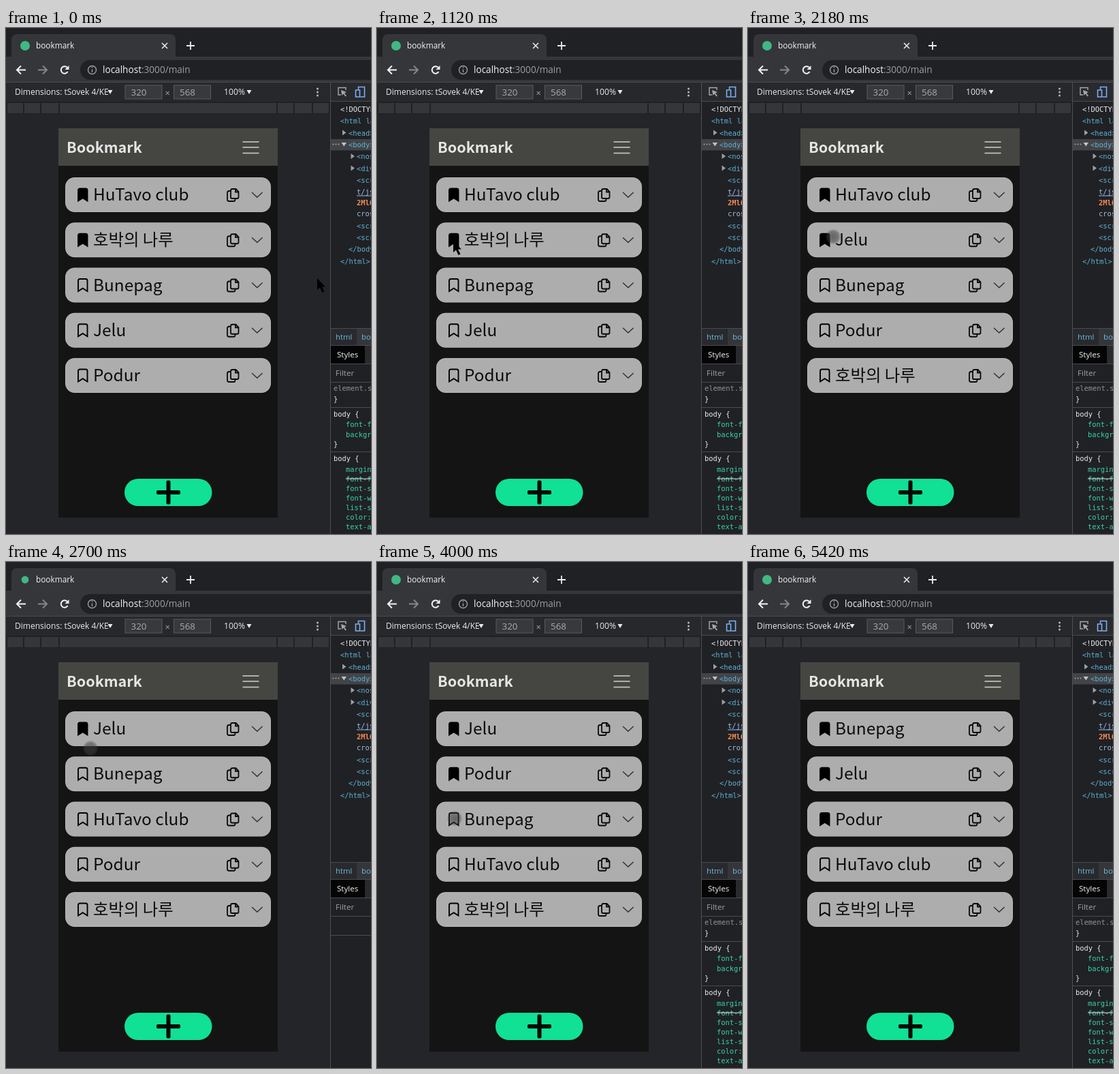
These frames come from a looping animation (536x742 px, 5580 ms). An HTML page with a canvas:

```html
<!DOCTYPE html>
<html lang="en">
<head>
<meta charset="utf-8">
<title>bookmark</title>
<style>
html, body { margin: 0; width: 100%; height: 100%; overflow: hidden; background: #202124; }
canvas { display: block; width: 536px; height: 742px; }
</style>
</head>
<body>
<canvas id="stage" width="536" height="742"></canvas>
<script>
const ctx = document.getElementById('stage').getContext('2d');
const LOOP = 5580;
const UI = '"Open Sans", "Noto Sans", sans-serif';
const MONO = '"DejaVu Sans Mono", monospace';
const APP = '"Noto Sans CJK KR", "Noto Sans KR", "Noto Sans CJK JP", "Noto Sans CJK", sans-serif';

// Listed in sorting order; starred items come first.
const names = ['Bunepag', 'HuTavo club', 'Jelu', 'Podur', '호박의 나루'];
const startStars = [1, 4];
// time, item, how long the plain arrow stays
const clicks = [
  [612, 2, 150], [870, 2, 320], [1190, 4, 190], [1780, 2, 190],
  [2500, 1, 190], [3490, 3, 210], [4190, 0, 170]
];
const LOAD = 150, SETTLE = 240;

// time, x, y of the pointer
const path = [
  [20, 457, 367], [580, 132, 436], [605, 114, 441], [750, 114, 441],
  [865, 112, 312], [1380, 112, 312], [1740, 114, 376], [1970, 114, 376],
  [2180, 125, 306], [2440, 114, 244], [2680, 117, 248], [2700, 124, 273],
  [2920, 124, 262], [3420, 119, 438], [3480, 113, 440], [3700, 113, 440],
  [4000, 114, 376], [4360, 114, 376], [4480, 151, 439], [4760, 172, 462],
  [5150, 273, 581], [5380, 273, 581], [5420, 314, 589]
];

function box(x, y, w, h, color, r = 0) {
  ctx.fillStyle = color;
  ctx.beginPath();
  ctx.roundRect(x, y, w, h, r);
  ctx.fill();
}

function disc(x, y, r, color) {
  ctx.fillStyle = color;
  ctx.beginPath();
  ctx.arc(x, y, r, 0, 7);
  ctx.fill();
}

function stroke(color, width, d, x = 0, y = 0) {
  ctx.save();
  ctx.translate(x, y);
  ctx.strokeStyle = color;
  ctx.lineWidth = width;
  ctx.stroke(new Path2D(d));
  ctx.restore();
}

function shape(color, d, x = 0, y = 0) {
  ctx.save();
  ctx.translate(x, y);
  ctx.fillStyle = color;
  ctx.fill(new Path2D(d));
  ctx.restore();
}

function text(s, x, y, size, color, family = UI, weight = 400) {
  ctx.font = `${weight} ${size}px ${family}`;
  ctx.fillStyle = color;
  ctx.fillText(s, x, y);
}

const code = (s, x, y, color) => text(s, x, y, 10.4, color, MONO);

function getState(t) {
  const stars = new Set(startStars);
  const sorted = () => names.map((_, i) => i)
    .sort((a, b) => stars.has(b) - stars.has(a) || a - b);
  let order = sorted(), age = 1e4, arrow = false;
  for (const [at, item, hold] of clicks) {
    if (t < at) break;
    if (!stars.delete(item)) stars.add(item);
    age = t - at;
    if (age >= LOAD) order = sorted();
    arrow = age < hold;
  }
  return { stars, order, age, arrow };
}

function pointer(t) {
  const i = path.findIndex(p => p[0] > t);
  if (i === 0) return path[0].slice(1);
  if (i < 0) return path[path.length - 1].slice(1);
  const [t0, x0, y0] = path[i - 1], [t1, x1, y1] = path[i];
  let k = (t - t0) / (t1 - t0);
  k = k * k * (3 - 2 * k);
  return [x0 + (x1 - x0) * k, y0 + (y1 - y0) * k];
}

function browser({ age }) {
  const loading = age < LOAD;
  box(0, 0, 536, 80, '#202124');
  box(8, 9, 241, 40, '#35363a', 8);
  box(0, 42, 536, 38, '#35363a');
  if (loading) disc(28, 19, 1, '#4a4b4f');
  else disc(28, 26, 7 * Math.min(1, 0.45 + (age - LOAD) / 160), '#41b883');
  text('bookmark', 44, 30, 11.8, '#f1f3f4');
  stroke('#e8eaed', 1.6, 'M229 22l8 8m0-8l-8 8');
  stroke('#e8eaed', 1.8, 'M265 26h12m-6-6v12');

  stroke('#f1f3f4', 2, 'M29 61.5H16m6-6l-6 6 6 6');
  stroke('#85878b', 2, 'M47 61.5h13m-6-6l6 6-6 6');
  if (loading) {
    stroke('#f1f3f4', 2, 'M81 56l11 11m0-11l-11 11');
  } else {
    ctx.strokeStyle = '#f1f3f4';
    ctx.lineWidth = 2;
    ctx.beginPath();
    ctx.arc(86, 61.5, 5.2, 0.5, 5.5);
    ctx.stroke();
    shape('#f1f3f4', 'M92.5 55v6h-6z');
  }
  box(109, 47, 440, 29, '#202124', 14.5);
  stroke('#9aa0a6', 1.4, 'M132.5 61.5a6 6 0 1 1-12 0a6 6 0 1 1 12 0M126.5 60.5v4.5m0-8v1.6');
  text('localhost', 142, 66, 13.6, '#f1f3f4');
  const w = ctx.measureText('localhost').width;
  text(':3000/main', 142 + w, 66, 13.6, '#9aa0a6');
}

function field(x, value) {
  box(x, 83.5, 55, 21, '#5a5b5e');
  box(x + 1, 84.5, 53, 19, '#38393c');
  text(value, x + 9, 98.5, 13.4, '#a9acb0');
}

function deviceBar() {
  box(0, 80, 476, 662, '#242529');
  box(0, 79, 536, 1, '#4a4b4e');
  box(0, 80, 476, 28, '#27282b');
  text('Dimensions: tSovek 4/KE', 13, 98, 12, '#e8eaed');
  shape('#e8eaed', 'M149.5 91h7l-3.5 6z');
  field(174.5, '320');
  text('×', 233.5, 99.5, 13, '#a0a3a7');
  field(246, '568');
  text('100%', 320, 98, 12.2, '#e8eaed');
  shape('#e8eaed', 'M353.5 91h7l-3.5 6z');
  for (const y of [89, 94, 99]) disc(457.5, y, 1.5, '#b5b8bc');

  box(0, 108, 476, 18, '#202124');
  for (const [x, w] of [[2, 23], [27, 23], [52, 25], [79, 318], [399, 23], [424, 25], [451, 23]])
    box(x, 110, w, 15, '#35363a');
}

function row(name, starred, y) {
  box(87, y, 302, 51, '#b9b9b9', 14);
  box(87.7, y + 0.7, 300.6, 49.6, '#adadad', 13.4);
  const mark = 'M1 3.5Q1 1 3.5 1h8.5q2.5 0 2.5 2.5V19l-6.8-4.3L1 19z';
  if (starred) shape('#000', mark, 105, y + 15.5);
  stroke('#000', 1.9, mark, 105, y + 15.5);
  text(name, 128, y + 34, 24.4, '#0c0c0c', APP, 500);
  stroke('#0a0a0a', 1.8,
    'M13.5 1H8.5Q6 1 6 3.5V13q0 2 2 2h7.5q2 0 2-2V5zM13 1v4.5h4.5' +
    'M6 4H3.5Q1 4 1 6.5V16.5q0 2.5 2.5 2.5h7q2 0 2-2.5V15', 324, y + 16);
  stroke('#333', 1.5, 'M361 0l7.8 7.3 7.8-7.3', 0, y + 22);
}

function viewport({ stars, order }) {
  box(77, 147, 322, 571, '#141414');
  box(77, 147, 322, 55, '#454542');
  text('Bookmark', 89, 183, 21.6, '#e6e6e6', APP, 700);
  for (const y of [167, 175, 183.5])
    stroke('#c9c9c9', 1.6, `M347.5 ${y}h24`);
  order.forEach((item, i) => row(names[item], stars.has(item), 219 + i * 66.25));
  box(174, 661, 128.5, 40, '#10e194', 20);
  box(221, 678, 35, 6, '#050505', 2);
  box(235.5, 663.5, 6, 35, '#050505', 2);
}

function elements(loading) {
  const tag = '#5db0d7', white = '#e8eaed';
  box(477, 163, 59, 16.5, '#434447');
  for (const x of [480.5, 484.5, 488.5]) disc(x, 170.5, 1, '#a5a8ac');
  code('<!DOCTYPE html>', 491, 122.5, white);
  code('<html lang', 491, 139.5, tag);
  code('<head>', 503, 157.5, tag);
  shape('#9aa0a6', 'M494 149.5l5.5 4-5.5 4z');
  code('<body>', 503, 174.5, tag);
  shape('#c0c3c7', 'M492.5 168h7.5l-3.7 5.5z');
  if (loading) {
    code('</html>', 491, 206, tag);
    return;
  }
  for (const y of [188, 205.5])
    shape('#9aa0a6', 'M506.5-4l5.5 4-5.5 4z', 0, y);
  code('<noscript>', 515, 192, tag);
  code('<div id', 515, 209.5, tag);
  code('<script', 515, 227, tag);
  code('t/js/app', 515, 243.5, '#9bbbf0');
  box(515, 245.5, 21, 1, '#9bbbf0');
  text('2Ml6', 515, 260, 10.4, '#f28b54', MONO, 700);
  code('cross', 515, 276, '#9bbbdc');
  code('<script', 515, 293.5, tag);
  code('<script', 515, 310.5, tag);
  code('</body>', 503, 328, tag);
  code('</html>', 491, 345.5, tag);
}

function styles() {
  const prop = '#35d4a8', white = '#e8eaed';
  code('element.style', 481, 531.5, '#8f9296');
  code('}', 481, 548, white);
  box(477, 556, 59, 1, '#4a4b4e');
  code('body {', 481, 569.5, white);
  code('font-family', 499, 585, prop);
  code('background', 499, 599.5, prop);
  code('}', 481, 613.5, white);
  box(477, 621, 59, 1, '#4a4b4e');
  code('body {', 481, 635, white);
  ['margin:', 'font-family', 'font-size', 'font-weight', 'list-style', 'color:', 'text-align']
    .forEach((s, i) => code(s, 499, 650.5 + i * 14.1, prop));
  box(499, 660.5, 37, 1, white);
}

function devtools({ age }) {
  box(476, 80, 60, 662, '#202124');
  box(476, 80, 1, 662, '#4f5053');
  box(477, 80, 59, 28, '#292a2d');
  box(477, 107, 59, 1, '#4a4b4e');
  stroke('#a5a8ac', 1.4, 'M492 98h-4V87.5h11V91');
  shape('#a5a8ac', 'M492 91l8 3-3 1.5 3 4-1.5 1-3-4-2 2.5z');
  stroke('#78b0f5', 1.6, 'M517.5 90V86.5h9V101h-6M513.5 91h6v10h-6z');

  elements(age < LOAD);
  box(477, 440, 59, 1, '#4a4b4e');
  box(477, 441, 59, 24, '#292a2d');
  box(515, 441, 21, 24, '#35363a');
  text('html', 484, 457, 11.4, '#6cb9dd');
  text('body', 522, 457, 11.4, '#6cb9dd');
  box(477, 465, 59, 1, '#4a4b4e');
  box(477, 466, 59, 26, '#292a2d');
  box(477, 466, 50, 26, '#050505');
  text('Styles', 486, 483, 11.6, '#f1f3f4');
  box(477, 492, 59, 1, '#4a4b4e');
  text('Filter', 484, 510, 11.6, '#a0a3a7');
  box(477, 519, 59, 1, '#4a4b4e');
  if (age < SETTLE) box(477, 547, 59, 1, '#4a4b4e');
  else styles();
}

function cursor(t, { arrow }) {
  if (t >= 5410) return;
  const [x, y] = pointer(t);
  if (arrow || x > 399) {
    shape('#000', 'M0 0V17l4-3.5 3.5 7.5 3-1.5-3.5-7H12z', x, y);
    return;
  }
  const g = ctx.createRadialGradient(x, y, 0, x, y, 11);
  g.addColorStop(0, 'rgba(60,60,60,.65)');
  g.addColorStop(0.7, 'rgba(65,65,65,.5)');
  g.addColorStop(1, 'rgba(75,75,75,.12)');
  disc(x, y, 11, g);
}

function draw(t) {
  const state = getState(t);
  browser(state);
  deviceBar();
  viewport(state);
  devtools(state);
  cursor(t, state);
}

const begin = performance.now();
function tick() {
  draw((performance.now() - begin) % LOOP);
  requestAnimationFrame(tick);
}
tick();
</script>
</body>
</html>
```
